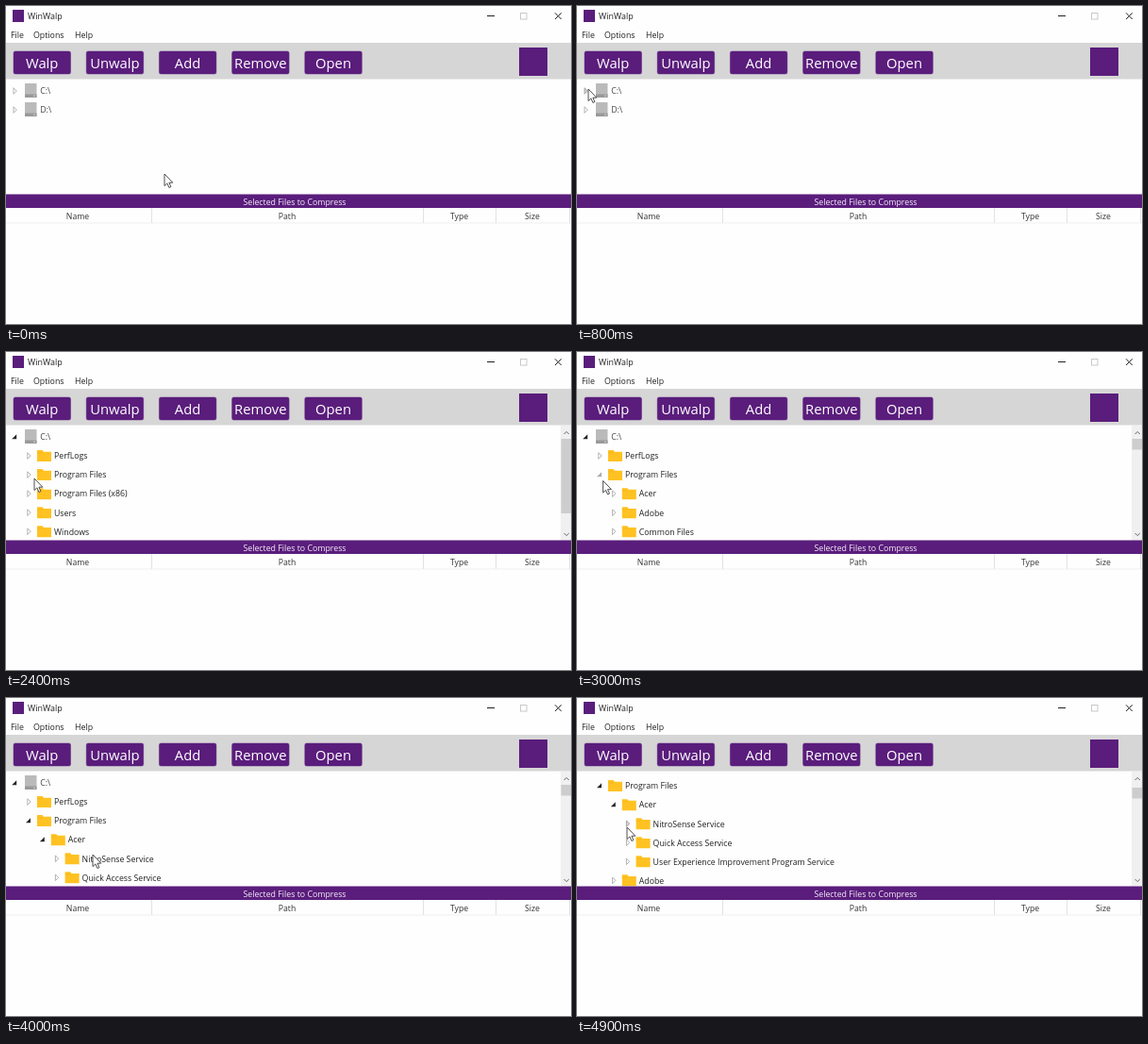
These frames come from a looping animation (599 by 337 pixels, 5 s). An HTML page with a canvas:

```html
<!DOCTYPE html>
<html lang="en">
<head>
<meta charset="utf-8">
<title>WinWalp</title>
<style>
  html, body { margin: 0; width: 100%; height: 100%; overflow: hidden; background: #fff; }
  canvas { display: block; width: 599px; height: 337px; }
</style>
</head>
<body>
<canvas id="stage"></canvas>
<script>
const W = 599, H = 337, LOOP = 5000, STEP = 100;
const PURPLE = '#5a1d7c', FONT = '"Open Sans", "Noto Sans", sans-serif';
const canvas = document.getElementById('stage');
const ctx = canvas.getContext('2d');
const dpr = window.devicePixelRatio || 1;
canvas.width = Math.round(W * dpr);
canvas.height = Math.round(H * dpr);

// Moments of the clicks and the wheel turn
const OPEN_DRIVE = 1400, OPEN_PROGRAMS = 2800, OPEN_ACER = 3300, WHEEL = 4300;

// Pointer stops: time, x, y
const path = [
  [0, 168, 178], [700, 13, 89], [800, 12, 88], [1400, 11, 90.5], [1700, 11, 90.5],
  [2400, 30, 134], [2700, 24, 131], [2900, 24, 131], [3200, 38, 152],
  [3600, 38, 153], [4000, 92, 166], [4300, 94, 164], [4800, 53, 137], [5000, 53, 137]
];

function pointerAt(t) {
  let i = 0;
  while (i < path.length - 2 && t >= path[i + 1][0]) i++;
  const [t0, x0, y0] = path[i], [t1, x1, y1] = path[i + 1];
  const p = (t - t0) / (t1 - t0), e = p * p * (3 - 2 * p);
  return [x0 + (x1 - x0) * e, y0 + (y1 - y0) * e];
}

function rect(x, y, w, h, color) {
  ctx.fillStyle = color;
  ctx.fillRect(x, y, w, h);
}

function text(str, x, y, size = 8.75, color = '#222', align = 'left') {
  ctx.font = size + 'px ' + FONT;
  ctx.textAlign = align;
  ctx.fillStyle = color;
  ctx.fillText(str, x, y);
}

function poly(points, fill, stroke, closed = true, width = 1) {
  ctx.beginPath();
  points.forEach(([x, y], i) => i ? ctx.lineTo(x, y) : ctx.moveTo(x, y));
  if (closed) ctx.closePath();
  if (fill) { ctx.fillStyle = fill; ctx.fill(); }
  if (stroke) { ctx.strokeStyle = stroke; ctx.lineWidth = width; ctx.stroke(); }
}

function button(label, x) {
  ctx.beginPath();
  ctx.roundRect(x - 0.5, 47.5, 61.5, 25, 2.5);
  ctx.fillStyle = '#9c7fae';
  ctx.fill();
  ctx.beginPath();
  ctx.roundRect(x, 48, 60.5, 24, 2);
  ctx.fillStyle = PURPLE;
  ctx.fill();
  text(label, x + 30.2, 66.3, 14.8, '#fff', 'center');
}

function drawWindow() {
  rect(0, 0, W, H, '#fefefe');
  rect(7, 4, 12, 13, PURPLE);
  text('WinWalp', 23, 14.2, 8.9);
  rect(510, 10, 8, 1, '#222');
  ctx.strokeStyle = '#c8c8c8';
  ctx.lineWidth = 1;
  ctx.strokeRect(545.5, 7.5, 6.5, 6.5);
  poly([[582, 7.3], [588.7, 14]], null, '#222', false);
  poly([[588.7, 7.3], [582, 14]], null, '#222', false);
  text('File', 5, 34.3, 8.8);
  text('Options', 29, 34.3, 8.8);
  text('Help', 73, 34.3, 8.8);

  rect(0, 39, W, 38.5, '#d6d6d6');
  ['Walp', 'Unwalp', 'Add', 'Remove', 'Open'].forEach((s, i) => button(s, 8 + 77.2 * i));
  rect(544, 44, 30, 30, PURPLE);
}

function drawList() {
  rect(0, 199.5, W, 14.5, PURPLE);
  text('Selected Files to Compress', 306, 210.7, 8.8, '#f4eef7', 'center');
  rect(0, 229.5, W, 1, '#f1f1f1');
  for (const x of [154, 442, 519, 597]) rect(x, 214, 1, 16, '#e2e2e2');
  [['Name', 76], ['Path', 298], ['Type', 480.5], ['Size', 558]]
    .forEach(([s, x]) => text(s, x, 226, 8.7, '#333', 'center'));
}

// Rows: depth, label, opened
function rowsAt(t) {
  const open = t >= OPEN_DRIVE;
  const rows = [[0, 'C:\\', open]];
  if (open) {
    const programs = t >= OPEN_PROGRAMS, acer = t >= OPEN_ACER;
    rows.push([1, 'PerfLogs'], [1, 'Program Files', programs]);
    if (programs) {
      rows.push([2, 'Acer', acer]);
      if (acer) rows.push([3, 'NitroSense Service'], [3, 'Quick Access Service'],
        [3, 'User Experience Improvement Program Service']);
      rows.push([2, 'Adobe'], [2, 'Common Files']);
    }
    rows.push([1, 'Program Files (x86)'], [1, 'Users'], [1, 'Windows']);
  }
  rows.push([0, 'D:\\']);
  return rows;
}

function drive(x, y) {
  rect(x, y - 8, 12.5, 15, '#bababa');
  rect(x, y + 3.5, 12.5, 3.5, '#999');
  rect(x + 9, y + 4.7, 2, 1, '#d2d2d2');
}

function folder(x, y) {
  poly([[x, y - 6], [x + 5.5, y - 6], [x + 7, y - 4.3], [x + 15, y - 4.3],
    [x + 15, y + 6], [x, y + 6]], '#ffc222');
  rect(x, y - 3.6, 5.5, 0.7, '#f2b316');
}

function expander(x, y, open, hover) {
  if (open) {
    const c = hover ? '#a9adaf' : '#262626';
    poly([[x + 1.7, y - 2.8], [x + 1.7, y + 2.2], [x - 3.3, y + 2.2]], c);
  } else {
    poly([[x - 1.5, y - 3.3], [x + 1.8, y], [x - 1.5, y + 3.3]],
      hover ? '#d2d6d8' : '#fff', hover ? '#999' : '#a3a3a3', true, 0.85);
  }
}

function drawTree(t, mx, my) {
  const shift = t >= WHEEL ? 37 : 0;
  ctx.save();
  ctx.beginPath();
  ctx.rect(0, 80.5, W, 119);
  ctx.clip();
  rowsAt(t).forEach(([depth, label, open], i) => {
    const y = 90 + 20.05 * i - shift;
    if (y < 76 || y > 206) return;
    const x = 9.5 + 14.8 * depth;
    const hover = Math.abs(mx - x) < 4.5 && my > y - 6 && my < y + 7;
    expander(x, y, open, hover);
    if (depth) folder(x + 8.7, y); else drive(x + 10.5, y);
    text(label, x + 26.7, y + 3.3, 8.75, depth ? '#222' : '#444');
  });
  ctx.restore();
  if (t >= OPEN_DRIVE) drawScrollbar(t);
}

function drawScrollbar(t) {
  rect(588, 78, 11, 121.5, '#f0f0f0');
  const deep = t >= OPEN_PROGRAMS;
  rect(588.5, t >= WHEEL ? 95 : 92, 10.5, deep ? 11.5 : 79, '#cdcdcd');
  poly([[591.6, 87], [594.2, 84.4], [596.8, 87]], null, '#666', false);
  poly([[591.6, 192], [594.2, 194.6], [596.8, 192]], null, '#666', false);
}

function drawPointer(x, y) {
  const shape = [[0, 0], [0, 12.6], [2.9, 9.9], [4.9, 14.5], [6.9, 13.6],
    [4.9, 9.2], [8.8, 9.2]];
  poly(shape.map(([a, b]) => [x + a, y + b]), '#fff', '#3c3c3c', true, 0.9);
}

function draw(t) {
  ctx.setTransform(dpr, 0, 0, dpr, 0, 0);
  const [mx, my] = pointerAt(t);
  drawWindow();
  drawTree(t, mx, my);
  drawList();
  drawPointer(mx, my);
}

const start = performance.now();
function tick() {
  const t = (performance.now() - start) % LOOP;
  draw(Math.floor(t / STEP) * STEP);
  requestAnimationFrame(tick);
}
tick();
</script>
</body>
</html>
```
